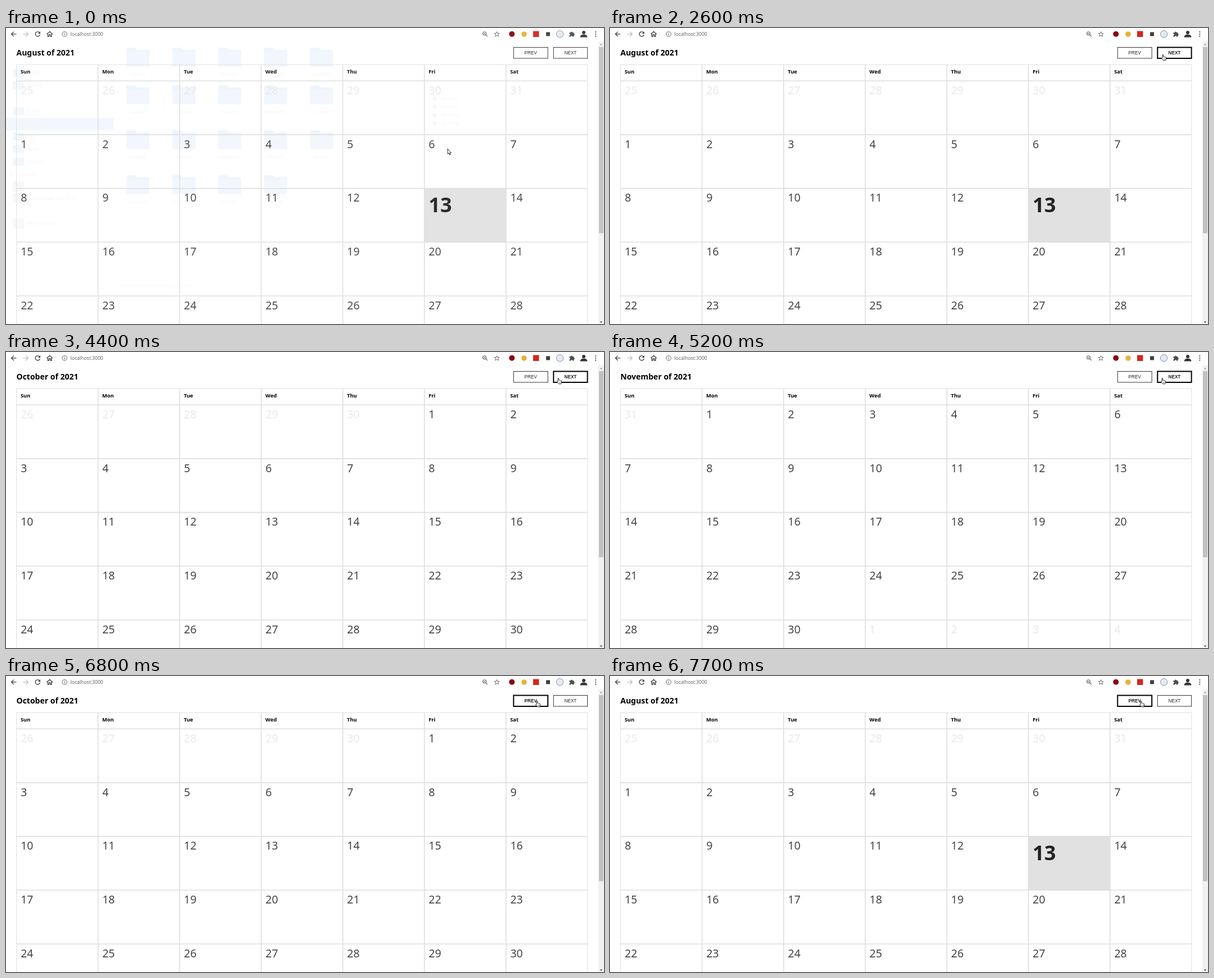
An HTML page for the animation above (8 s loop, 1063 by 527 pixels).

```html
<!DOCTYPE html>
<html lang="en">
<head>
<meta charset="utf-8">
<title>Calendar</title>
<style>
  html, body { margin: 0; width: 100%; height: 100%; overflow: hidden; background: #fff; }
  svg { display: block; font-family: "Noto Sans", "Open Sans", sans-serif; }
  .bold { font-weight: 700; }
  .button { font: 8.2px "Liberation Sans", Arial, sans-serif; text-anchor: middle; }
  .icon { fill: none; stroke: #3c4043; stroke-width: 1.3; }
</style>
</head>
<body>
<svg id="stage" width="1063" height="527" viewBox="0 0 1063 527"></svg>
<script>
const LOOP = 8000, LEFT = 18.6, TOP = 94.2, COL = 145.03, ROW = 95.7;
const MONTHS = { 7: "August", 8: "September", 9: "October", 10: "November" };
const stage = document.getElementById("stage");

function add(parent, tag, attrs = {}, text) {
  const el = document.createElementNS("http://www.w3.org/2000/svg", tag);
  for (const key in attrs) el.setAttribute(key, attrs[key]);
  if (text !== undefined) el.textContent = text;
  parent.appendChild(el);
  return el;
}
const group = (attrs) => add(stage, "g", attrs);
const rect = (parent, x, y, width, height, fill, extra) =>
  add(parent, "rect", { x, y, width, height, fill, ...extra });
const label = (parent, x, y, size, fill, text, extra) =>
  add(parent, "text", { x, y, "font-size": size, fill, ...extra }, text);
const path = (parent, d, extra) => add(parent, "path", { d, ...extra });
const dot = (parent, cx, cy, r, fill, extra) =>
  add(parent, "circle", { cx, cy, r, fill, ...extra });

// Faint file manager lingering behind the page
function drawGhost(g) {
  rect(g, 0, 160, 191, 22, "#f1f7fe");
  const side = ["Recent", "Starred", "Home", "Desktop", "Files", "Music", "Pictures"];
  [80, 102, 148, 170, 193, 215, 238].forEach((y, i) => {
    rect(g, 12, y - 7, 20, 14, "#f1f6fc", { rx: 2 });
    label(g, 36, y + 3, 8, "#f5f5f5", side[i]);
  });
  label(g, 6, 264, 9, "#f6f6f6", "Bookmarks");
  [282, 303, 348].forEach(y => rect(g, 12, y - 9, 20, 18, "#f8f8f8"));
  label(g, 36, 307, 8, "#f6f6f6", "shared folder with files");
  label(g, 36, 351, 8, "#f6f6f6", "other locations");
  const names = ["archive", "backup", "projects", "sources", "examples"];
  [35, 102, 182, 262].forEach((y, r) => {
    for (let c = 0; c < (r === 3 ? 4 : 5); c++) {
      const x = 214 + c * 81.6;
      path(g, `M${x} ${y + 2}q0-2 2-2h13l4 4h20q2 0 2 2v26q0 2-2 2h-37q-2 0-2-2z`, { fill: "#edf4fc" });
      rect(g, x, y + 8, 41, 26, "#f1f7fe", { rx: 2 });
      label(g, x + 20, y + 50, 8, "#f5f5f5", names[(c + r) % 5], { "text-anchor": "middle" });
    }
  });
  for (let y = 126; y < 172; y += 14.6) {
    dot(g, 762, y, 3.5, "#f7f7f7");
    label(g, 772, y + 3, 8, "#f5f5f5", "list entry");
  }
  label(g, 202, 462, 8, "#f8f8f8", "items in this folder, free space left");
}

function drawToolbar(g) {
  const icon = (d, extra) => path(g, d, { class: "icon", ...extra });
  icon("M18.5 10.8H9.8M13.8 6.6L9.6 10.8L13.8 15");
  icon("M30.5 10.8H39.2M35.2 6.6L39.4 10.8L35.2 15", { style: "stroke:#b9bbbd" });
  icon("M59.5 8A4.2 4.2 0 1 0 60.4 12");
  path(g, "M61 5.9V10.2H56.8z", { fill: "#3c4043" });
  icon("M72.6 11L77.7 6.3L82.8 11M74.3 10V15H76.5V12H79V15H81.1V10");
  dot(g, 104.2, 10.8, 4.3, "none", { stroke: "#5f6368" });
  path(g, "M104.2 10V13.3M104.2 8.2V9.2", { stroke: "#5f6368" });
  label(g, 114.5, 14, 8.6, "#5f6368", "localhost:3000");

  dot(g, 850.6, 9.8, 3, "none", { stroke: "#5f6368", "stroke-width": 1.1 });
  path(g, "M852.8 12L856 15.2M849.2 9.8H852", { stroke: "#5f6368", "stroke-width": 1.2 });
  path(g, "M872.6 6.6L873.8 9.4L877 9.7L874.6 11.8L875.3 14.9L872.6 13.2L869.9 14.9L870.6 11.8L868.2 9.7L871.4 9.4Z",
    { fill: "none", stroke: "#5f6368" });
  dot(g, 899.3, 10.7, 5, "#870a14");
  dot(g, 921, 11, 4.8, "#e8b13c");
  rect(g, 937, 5.5, 10.5, 10.5, "#d0281f");
  rect(g, 960, 7.4, 7, 7, "#3c4043");
  dot(g, 984.6, 10.8, 6.2, "#e4eaf2", { stroke: "#8592a8" });
  path(g, "M1001.5 8H1004a1.5 1.5 0 0 1 3 0H1009.4V10.2a1.5 1.5 0 0 1 0 3V15.5H1007a1.4 1.4 0 0 0-2.8 0H1001.5V13a1.4 1.4 0 0 0 0-2.8Z",
    { fill: "#4a4d51" });
  dot(g, 1027, 8, 3, "#333");
  path(g, "M1020.5 16.5Q1021 11.5 1027 11.5T1033.5 16.5Z", { fill: "#333" });
  [7, 10.8, 14.6].forEach(y => dot(g, 1048.3, y, 1.1, "#3c4043"));
}

function drawScrollbar(g) {
  rect(g, 1053, 24, 10, 503, "#f1f1f1");
  rect(g, 1054, 34, 8, 331.5, "#c1c1c1");
  path(g, "M1055.6 30.4L1058 27.8L1060.4 30.4Z", { fill: "#a3a3a3" });
  path(g, "M1055.6 522.6L1058 525.2L1060.4 522.6Z", { fill: "#505050" });
}

function drawGrid(g) {
  const line = { stroke: "#dedede" };
  const right = LEFT + 7 * COL;
  for (let c = 0; c <= 7; c++) {
    const x = LEFT + c * COL, edge = c % 7 === 0;
    path(g, `M${x} 65V527`, { ...line, "stroke-width": edge ? 1 : 1.6 });
  }
  path(g, `M${LEFT} 65.2H${right}`, { ...line, "stroke-width": 1 });
  for (let r = 0; r < 5; r++)
    path(g, `M${LEFT} ${TOP + r * ROW}H${right}`, { ...line, "stroke-width": 1.6 });
  ["Sun", "Mon", "Tue", "Wed", "Thu", "Fri", "Sat"].forEach((day, c) =>
    label(g, 26 + c * COL, 81, 9.3, "#000", day, { class: "bold" }));
}

function makeButton(x, width, text) {
  const g = group();
  const box = rect(g, x, 34.5, width, 19.5, "#fff", { stroke: "#222" });
  const caption = label(g, x + width / 2, 46.9, 8.2, "#222", text, { class: "button" });
  return hot => {
    box.setAttribute("stroke-width", hot ? 2 : 1);
    box.setAttribute("stroke", hot ? "#000" : "#333");
    caption.style.fontWeight = hot ? 700 : 400;
  };
}

const ghost = group();
drawGhost(ghost);
drawToolbar(group());
drawScrollbar(group());
const today = rect(stage, LEFT + 5 * COL, TOP + 2 * ROW, COL, ROW, "#e1e1e1");
drawGrid(group());
const heading = label(stage, 18.5, 49, 14, "#000", "", { class: "bold" });
const cells = Array.from({ length: 35 }, (_, i) =>
  label(stage, 26.2 + (i % 7) * COL, 118 + Math.floor(i / 7) * ROW, 19.5, "#444", ""));
const setPrev = makeButton(902.3, 60.9, "PREV");
const setNext = makeButton(973.3, 60.3, "NEXT");
const veil = rect(stage, 0, 0, 1063, 527, "#fff", { opacity: 0.05 });
const outline = { fill: "#fff", stroke: "#111", "stroke-width": 0.9, "stroke-linejoin": "round" };
const arrow = path(stage, "M0 0V9.4L2.2 7.6L3.6 10.9L5 10.3L3.6 7.2H6.4Z", outline);
const hand = group(outline);
path(hand, "M2 6.6V1.2Q2 .4 2.8 .4T3.6 1.2V4.2Q4.6 3.7 5.2 4.5Q6.3 4.1 6.9 5Q8.4 4.8 8.5 6V8Q8.3 9.6 7.6 10.8H3.6Q2.6 9.4 .8 7.6Q.2 6.6 1 6.3Z");
path(hand, "M4.3 7.4V9.2M5.6 7.4V9.2M6.9 7.4V9.2", { "stroke-width": 0.5 });

let shown = -1;
function showMonth(month) {
  if (month === shown) return;
  shown = month;
  heading.textContent = `${MONTHS[month]} of 2021`;
  const lead = new Date(2021, month, 1).getDay() || 7;
  today.style.display = month === 7 ? "" : "none";
  cells.forEach((cell, i) => {
    const date = new Date(2021, month, 1 - lead + i);
    const isToday = date.getMonth() === 7 && date.getDate() === 13;
    cell.textContent = date.getDate();
    cell.setAttribute("fill", isToday ? "#222" : date.getMonth() === month ? "#444" : "#e9e9e9");
    cell.setAttribute("font-size", isToday ? 36 : 19.5);
    cell.setAttribute("font-weight", isToday ? 700 : 400);
    cell.setAttribute("y", 118 + Math.floor(i / 7) * ROW + (isToday ? 18.8 : 0));
  });
}

// start, number of 100 ms steps, destination
const MOVES = [
  [600, 4, 891, 117], [1200, 3, 974, 48], [1800, 3, 982, 47],
  [2300, 1, 980, 47], [3900, 1, 979, 46], [5600, 4, 941, 44]
];
const CLICKS = [[3900, 1], [4400, 1], [5200, 1], [6800, -1], [7200, -1], [7700, -1]];

function pointerAt(t) {
  let x = 785, y = 215;
  for (const [start, steps, toX, toY] of MOVES) {
    if (t < start) break;
    const k = Math.min(1, (Math.floor((t - start) / 100) + 1) / steps);
    x += (toX - x) * k;
    y += (toY - y) * k;
  }
  return [x, y];
}

function render(t) {
  showMonth(CLICKS.reduce((m, [at, step]) => t >= at ? m + step : m, 7));
  const lingering = t < 2600 ? "" : "none";
  ghost.style.display = veil.style.display = lingering;

  const [x, y] = pointerAt(t);
  const tip = x + 2.8, level = y >= 34 && y <= 54;
  const onPrev = level && tip > 902 && tip < 962;
  const onNext = level && tip > 973 && tip < 1034;
  setPrev(onPrev);
  setNext(onNext);
  const over = onPrev || onNext;
  hand.style.display = over ? "" : "none";
  arrow.style.display = over ? "none" : "";
  (over ? hand : arrow).setAttribute("transform", `translate(${x} ${y})`);
}

function tick() {
  render(performance.now() % LOOP);
  requestAnimationFrame(tick);
}
tick();
</script>
</body>
</html>
```
